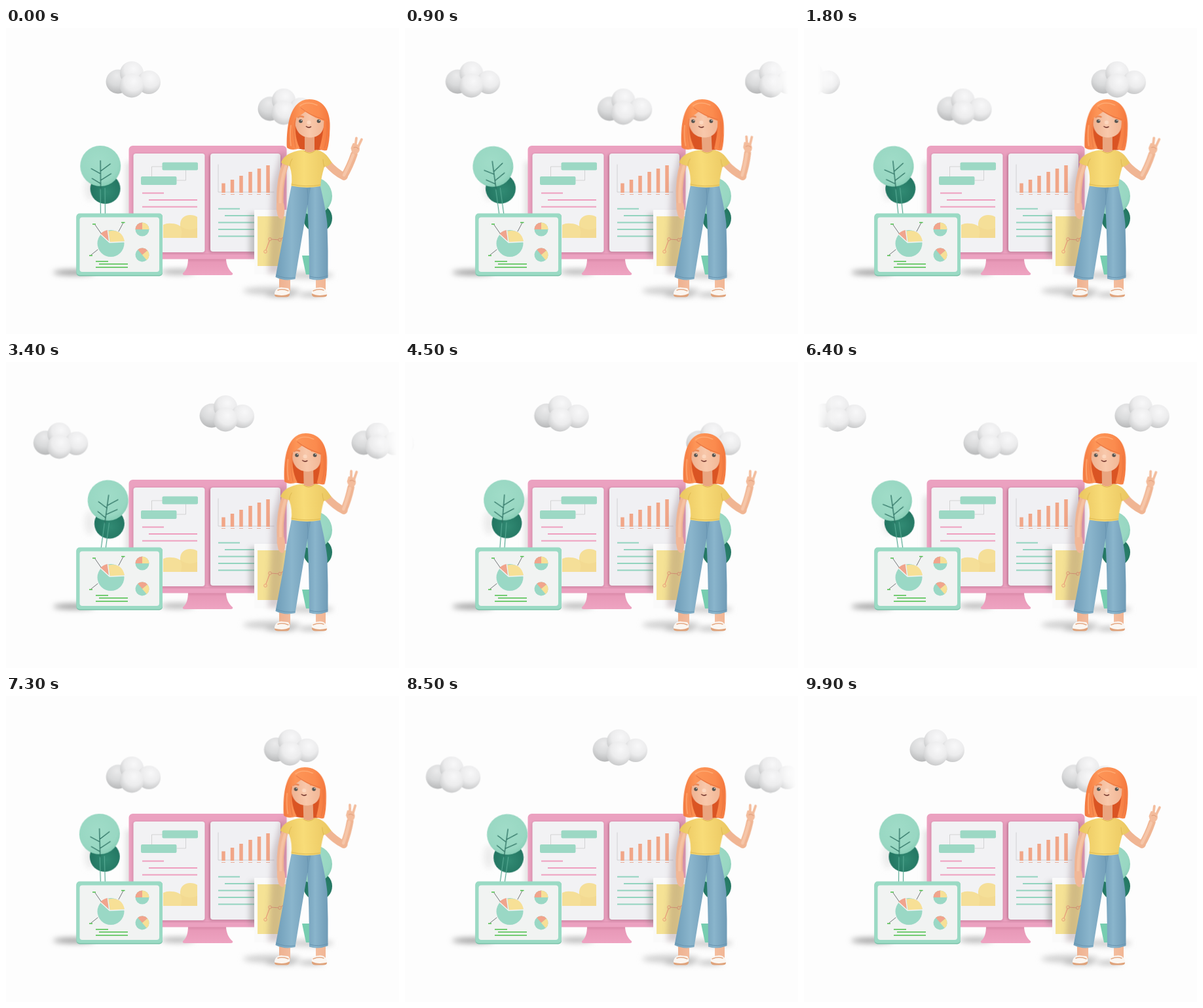
Recreate the animation shown at these times as an HTML page. Size 600 px wide and 468 px high, loop 10 s.

```html
<!DOCTYPE html>
<html lang="en">
<head>
<meta charset="utf-8">
<title>Analytics presenter</title>
<style>
html, body { margin: 0; width: 100%; height: 100%; overflow: hidden; background: #fdfdfd; }
svg { display: block; width: 100vw; height: 100vh; }
.line { fill: none; stroke-linecap: round; stroke-linejoin: round; }

/* clouds: one copy leaves to the left while the next comes in */
.leave { animation: leave 5s steps(50) infinite; }
.enter { animation: enter 5s steps(50) infinite; }
@keyframes leave { to { transform: translateX(-504px); } }
@keyframes enter { from { transform: translateX(447px); } to { transform: translateX(0); } }

/* swaying parts: cosine-like, there and back */
.sway { animation: 1s cubic-bezier(.37, 0, .63, 1) -.05s infinite alternate; }
.tree { transform-origin: 146px 290px; animation: tree 2.5s cubic-bezier(.37, 0, .63, 1) -1.3s infinite alternate; }
.body { transform-origin: 458px 243px; animation-name: body; }
.head { animation-name: head; }
.face { animation-name: face; }
.forearm { transform-origin: 517px 228px; animation-name: forearm; }
@keyframes tree { from { transform: rotate(8.3deg); } to { transform: rotate(-8.3deg); } }
@keyframes body { to { transform: skewX(2.4deg); } }
@keyframes head { to { transform: translateX(-4px); } }
@keyframes face { to { transform: translateX(-2px); } }
@keyframes forearm { to { transform: rotate(-10deg); } }
</style>
</head>
<body>
<svg viewBox="0 0 600 468" preserveAspectRatio="none">
<defs>
  <radialGradient id="ball" cx=".58" cy=".32" r=".78">
    <stop offset="0" stop-color="#f8f8f9"/><stop offset=".5" stop-color="#ececed"/><stop offset="1" stop-color="#bfc0c1"/>
  </radialGradient>
  <radialGradient id="shade" cx=".45" cy=".25" r=".8">
    <stop offset="0" stop-color="#ebebec"/><stop offset=".5" stop-color="#d9dadb"/><stop offset="1" stop-color="#b2b3b4"/>
  </radialGradient>
  <radialGradient id="mint" cx=".45" cy=".4" r=".65">
    <stop offset="0" stop-color="#a0dcc8"/><stop offset=".75" stop-color="#98d7c2"/><stop offset="1" stop-color="#84cbb3"/>
  </radialGradient>
  <radialGradient id="pine" cx=".55" cy=".6" r=".65">
    <stop offset="0" stop-color="#318a73"/><stop offset="1" stop-color="#1f705d"/>
  </radialGradient>
  <linearGradient id="stand" x2="0" y2="1">
    <stop offset="0" stop-color="#d584a4"/><stop offset=".25" stop-color="#e899b8"/><stop offset="1" stop-color="#eea3c1"/>
  </linearGradient>
  <linearGradient id="hair">
    <stop offset="0" stop-color="#f47a40"/><stop offset=".3" stop-color="#fd9557"/><stop offset=".75" stop-color="#fb8b4e"/><stop offset="1" stop-color="#f4773d"/>
  </linearGradient>
  <linearGradient id="skin">
    <stop offset="0" stop-color="#eeb190"/><stop offset=".5" stop-color="#f8c8ab"/><stop offset="1" stop-color="#f1b695"/>
  </linearGradient>
  <linearGradient id="shirt">
    <stop offset="0" stop-color="#eac55e"/><stop offset=".45" stop-color="#f8dc78"/><stop offset="1" stop-color="#eac660"/>
  </linearGradient>
  <linearGradient id="jeans">
    <stop offset="0" stop-color="#6f9db8"/><stop offset=".45" stop-color="#8ab5cc"/><stop offset="1" stop-color="#6f9bb6"/>
  </linearGradient>
  <linearGradient id="edgeHigh" gradientUnits="userSpaceOnUse" x1="0" x2="600">
    <stop offset=".035" stop-color="#000"/><stop offset=".085" stop-color="#fff"/>
    <stop offset=".93" stop-color="#fff"/><stop offset=".975" stop-color="#000"/>
  </linearGradient>
  <linearGradient id="edgeLow" gradientUnits="userSpaceOnUse" x1="0" x2="600">
    <stop offset=".015" stop-color="#000"/><stop offset=".06" stop-color="#fff"/>
    <stop offset=".945" stop-color="#fff"/><stop offset=".995" stop-color="#000"/>
  </linearGradient>
  <mask id="high" maskUnits="userSpaceOnUse" x="0" y="0" width="600" height="468"><path fill="url(#edgeHigh)" d="M0 0H600V468H0z"/></mask>
  <mask id="low" maskUnits="userSpaceOnUse" x="0" y="0" width="600" height="468"><path fill="url(#edgeLow)" d="M0 0H600V468H0z"/></mask>
  <filter id="soft" x="-50%" y="-100%" width="200%" height="300%"><feGaussianBlur stdDeviation="4"/></filter>
  <filter id="blur" x="-50%" y="-50%" width="200%" height="200%"><feGaussianBlur stdDeviation="2"/></filter>
  <g id="cloud">
    <circle cx="171" cy="82" r="18.5" fill="url(#shade)"/>
    <circle cx="192" cy="69" r="18" fill="url(#ball)"/>
    <circle cx="218" cy="83" r="18" fill="url(#ball)"/>
    <circle cx="192" cy="88" r="18.5" fill="url(#ball)"/>
  </g>
</defs>

<rect width="600" height="468" fill="#fdfdfd"/>

<g mask="url(#high)">
  <use href="#cloud" class="leave"/>
  <use href="#cloud" class="enter"/>
</g>
<g mask="url(#low)">
  <g transform="translate(232 41.5)">
    <use href="#cloud" class="leave"/>
    <use href="#cloud" class="enter"/>
  </g>
</g>

<!-- ground shadows -->
<g filter="url(#soft)">
  <ellipse cx="104" cy="374" rx="32" ry="4" fill="#999"/>
  <ellipse cx="262" cy="373" rx="26" ry="4" fill="#b5b5b5"/>
  <ellipse cx="406" cy="402" rx="44" ry="6" fill="#cfcfcf"/>
  <ellipse cx="420" cy="408" rx="24" ry="3" fill="#aaa"/>
  <ellipse cx="466" cy="408" rx="20" ry="3" fill="#b5b5b5"/>
  <ellipse cx="462" cy="378" rx="38" ry="5" fill="#ccc"/>
  <ellipse cx="128" cy="246" rx="8" ry="18" fill="#ececec"/>
  <path fill="#e0e0e0" d="M183 205H195V345H183z"/>
</g>

<g class="tree">
  <circle cx="152" cy="246" r="23" fill="url(#pine)"/>
  <path class="line" stroke="#55a892" stroke-width="1.2" d="M144.500 245V292M151.500 245V292"/>
  <circle cx="145" cy="211" r="31" fill="url(#mint)"/>
  <path class="line" stroke="#2a6f60" stroke-width="1.3" d="M145 203V246M145 223L131 215M145 219L160 208M145 238L132 230M145 233L161 223"/>
</g>

<!-- monitor -->
<path fill="url(#stand)" d="M278 352H336C336 362 340 370 346 375Q347 378 343 378H273Q269 378 270 375C276 370 278 362 278 352z"/>
<rect x="187.500" y="180" width="241" height="173.500" rx="6" fill="#eba1c0"/>
<path fill="none" stroke="#df92b1" stroke-width="1.200" d="M191 345.500H425"/>
<rect x="194" y="193" width="110" height="151" rx="4" fill="#c9809f" filter="url(#blur)"/>
<rect x="310" y="193" width="109" height="150" rx="4" fill="#b97591" filter="url(#blur)"/>
<rect x="194.500" y="192" width="109" height="151" rx="4" fill="#f2f2f4"/>
<rect x="312" y="192" width="107" height="150" rx="4" fill="#f0f0f3"/>

<g class="line" stroke="#c9c9cb" stroke-width=".8">
  <path d="M239 212H222.500V227M261 233H274.500V217M324 209V251H409"/>
</g>
<rect x="238.500" y="205.500" width="54.500" height="12" rx="2" fill="#9cd8c4"/>
<rect x="206" y="227" width="54.500" height="13" rx="2" fill="#9cd8c4"/>
<path stroke="#ef9fc0" stroke-width="1.800" d="M208 252.500H241M218 263H292M208 273.500H292"/>
<path fill="#f5df98" d="M240 321V301Q246 298 253 299Q260 299 266 303C265 291 273 286 281 286Q288 286 292 289V321z"/>
<path fill="#f1d68b" opacity=".5" d="M266 303Q270 309 267 321H292V306Q278 312 266 303z"/>
<path stroke="#f1a688" stroke-width="5.500" d="M332 252V237.500M345.500 252V232M359 252V226M373 252V220M386.500 252V215M400 252V210"/>
<path stroke="#e8b09c" stroke-width="1" d="M329 254.500H335M343 254.500H349M356 254.500H362M370 254.500H376M383 254.500H389M397 254.500H403"/>
<path stroke="#93d4bf" stroke-width="1.800" d="M324 276.500H357M334 287H408M324 297.500H408M324 308H408M324 318.500H408"/>

<!-- card and plant behind the girl -->
<path fill="#777" opacity=".4" filter="url(#soft)" d="M372 284H420V350H372z"/>
<path fill="#fafafa" d="M379 278H432V377H379z"/>
<path fill="#f5e295" d="M384 288H430V364H384z"/>
<path class="line" stroke="#f0a17c" stroke-width="1.200" d="M396 342L403 323L418 324L426 318"/>
<g fill="#f5e295" stroke="#f0a17c"><circle cx="396" cy="342" r="2.300"/><circle cx="403" cy="323" r="2.300"/><circle cx="418" cy="324" r="2.300"/></g>
<circle cx="476" cy="291" r="22" fill="url(#pine)"/>
<circle cx="469" cy="257" r="29" fill="url(#mint)"/>
<path fill="#77cdb0" d="M452 348H476L473 377H458z"/>
<path fill="#6b4a52" opacity=".25" filter="url(#soft)" d="M428 190H420L406 240L404 290L400 376H420L430 240z"/>

<!-- tablet -->
<rect x="107.500" y="284" width="131.500" height="95.500" rx="5" fill="#78c2a8"/>
<rect x="107.500" y="283.500" width="131.500" height="94.500" rx="5" fill="#9adac4"/>
<rect x="112.500" y="289.500" width="121.500" height="83.500" rx="4" fill="#f1f3f2"/>
<circle cx="160" cy="329.500" r="20.500" fill="#9ad8c5"/>
<path fill="#f7e096" d="M159 328L156 310.500Q177 307 181 326z"/>
<path fill="#f0a48d" d="M157 327L144 315Q149 310 155 309z"/>
<path class="line" stroke="#f4f5f4" stroke-width="1.400" d="M145 316L158 328L155.500 310M158 328L181 327"/>
<path class="line" stroke="#74777a" stroke-width="1" d="M145 314L136 301M172 311L179 298M140 339L130 347"/>
<path stroke="#4cc04a" stroke-width="1.600" d="M132 300H137M176 297.500H181.500M127 348H132M137 357H156M142 361H186M137 366H186"/>
<g id="pie">
  <circle cx="208" cy="308" r="10.500" fill="#9ad8c5"/>
  <path fill="#f1a48c" d="M208 308H197.500A10.500 10.500 0 0 1 208 297.500z"/>
  <path fill="#f7e096" d="M208 308V297.500A10.500 10.500 0 0 1 218.500 308z"/>
</g>
<use href="#pie" transform="rotate(50 208 347) translate(0 39)"/>

<!-- legs -->
<path fill="url(#skin)" d="M417 378H434V402H417zM473 378H488V402H473z"/>
<g id="shoe">
  <path fill="#dfa27a" d="M410 407Q409 412 418 411.500H428Q434 411 433 405z"/>
  <path fill="#fbf6f1" d="M410 407C410 401 415 396 422 397L431 398Q434 402 433 406Q424 411 410 407.500z"/>
  <path class="line" stroke="#e3a985" stroke-width="1.500" d="M415 401Q422 398 431 402"/>
</g>
<use href="#shoe" transform="translate(900 0) scale(-1 1)"/>
<path fill="url(#jeans)" d="M456 240H479.500C483 256 488 276 490.500 300Q492 340 491.500 382Q477 388 463 383.500Q463 320 460 268z"/>
<path fill="url(#jeans)" d="M436 240H466Q463 254 460.500 270Q450 330 441.500 384Q426 388 411.500 381C418 345 424 318 428 282Q432 260 436 240z"/>
<path class="line" stroke="#6794b1" stroke-width="1" d="M460 246Q462 258 460.500 270M412.500 378Q426 384 441 382M464 380Q477 384 491 379"/>

<g class="sway body">
  <!-- arm at rest -->
  <path class="line" stroke="#efb493" stroke-width="10.500" d="M427 207C420 226 417.500 246 418.500 270"/>
  <path class="line" stroke="#f5c2a3" stroke-width="4.500" d="M427 212C421 228 418.500 246 418.500 268"/>
  <path fill="#f1b797" d="M413 268H424C426 278 425.500 287 422 292Q417 293 414.500 286Q412 277 413 268z"/>
  <!-- raised arm -->
  <path class="line" stroke="#f0b593" stroke-width="11.500" d="M490 206Q503 221 516 227"/>
  <g class="sway forearm">
    <path class="line" stroke="#f0b593" stroke-width="10.500" d="M516 227Q525 212 531.500 193"/>
    <path class="line" stroke="#f6c6a9" stroke-width="4.500" d="M516 225Q523 212 530 194"/>
    <ellipse cx="533.500" cy="185" rx="6.500" ry="7.500" fill="#f3bc9c"/>
    <path class="line" stroke="#f3bc9c" stroke-width="3.800" d="M533 183L535 168.500M537 183L543 170.500M528.500 184L531 178"/>
    <path class="line" stroke="#dd9b7a" stroke-width="1" d="M531 183Q535 181 538 185"/>
  </g>
  <!-- back of the hair -->
  <g class="sway head">
    <path fill="#da5423" d="M436 140H490V185Q463 190 436 182z"/>
  </g>
  <path fill="#eaa580" d="M456 160H471V190Q463 199 456 190z"/>
  <path fill="url(#shirt)" d="M454 186.500Q463 194 473 186.500C484 188 490 193 497.500 206Q493 211 486 212.500Q481 229 480 242Q458 246 435.500 241.500Q438 226 433 211Q426 210 420 206C424 194 438 188 454 186.500z"/>
  <path class="line" stroke="#dcb64f" stroke-width=".9" d="M433 211Q434 204 437 200M486 212.500Q484 206 484 201M436 239Q458 244 480 240M454 187Q463 196 473 187"/>
  <g class="sway head">
    <path fill="url(#skin)" d="M441 140C441 124 450 119 464 119C480 119 486 128 486 144C486 159 477 167.500 464.500 167.500C451 167.500 441 159 441 140z"/>
    <g class="sway face">
      <path class="line" stroke="#ec8956" stroke-width="2.500" d="M446 136.500Q449 134 454 136M473 136Q478 134 482 137.500"/>
      <circle cx="450" cy="142.500" r="2.800" fill="#53524e"/>
      <circle cx="477.500" cy="142.500" r="2.800" fill="#53524e"/>
      <circle cx="451" cy="141.500" r=".8" fill="#fff"/>
      <circle cx="478.500" cy="141.500" r=".8" fill="#fff"/>
      <circle cx="462.500" cy="144.500" r="3" fill="#fcd7bf"/>
      <path class="line" stroke="#7c4036" stroke-width="1.600" d="M458.500 150.500Q462 153.500 465.500 151"/>
    </g>
    <path fill="url(#hair)" d="M429 183C428 155 432 109 463 109C488 109 496 132 494.500 154Q494 176 490 187Q485 188.500 478.500 185C482 172 485 158 485.500 142Q470 137 457 128Q450 134 443.500 137C440 150 441.500 170 448.500 184Q436 188.500 429 183z"/>
    <path class="line" stroke="#ffb27c" stroke-width="1.600" opacity=".75" d="M449 119Q460 111 475 118M435 149Q433 165 435 180"/>
    <path class="line" stroke="#e87643" stroke-width="1" d="M450 122Q464 134 486 140M442 139Q437 157 442 183M490 143Q492 164 486 184"/>
  </g>
</g>
</svg>
</body>
</html>
```
